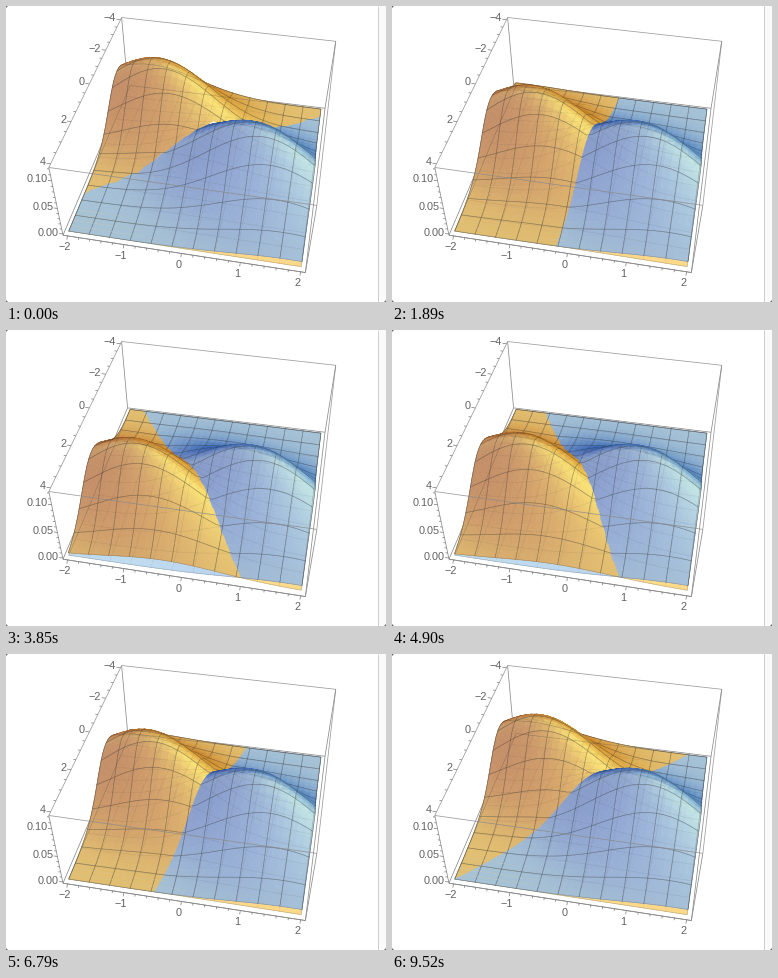
Write a matplotlib script that moves like this. It is 380x296 px and loops after 9660 ms.

```python
import numpy as np
import matplotlib.pyplot as plt
from matplotlib.animation import FuncAnimation
from matplotlib.collections import LineCollection, PolyCollection

W, H, DPI = 380, 296, 100
FRAMES, STEP_MS = 138, 70
N, MESH = 33, 3                      # cells per side, cells per mesh line

# Two normal densities with a shared covariance; only the first one moves.
COV = 1.1 * np.array([[1, 0.5], [0.5, 2]])
INV = np.linalg.inv(COV)
PEAK = 1 / (2 * np.pi * np.sqrt(np.linalg.det(COV)))
FIXED = np.array([1.0, 0.8])
MOVING_X = -1.03
LOW, HIGH, LEG = -2.07, 1.4, 53.75

# Frames on which the motion pauses
HOLDS = {10, 32, 41, 50, *range(63, 68), *range(78, 81), *range(100, 103),
         110, *range(122, 126), 137}
STEPS = np.cumsum([0] + [k not in HOLDS for k in range(1, FRAMES)])

# Flat colour, then its change with tilt to the right, front and back
ORANGE = np.array([[226, 191, 112], [40, 58, 10], [-16, -33, -6],
                   [-55, -125, -125]]) / 255
BLUE = np.array([[166, 194, 214], [45, 56, 22], [-6, -9, 6],
                 [-170, -135, -45]]) / 255
INK = (0.2, 0.2, 0.2)

BX, BY, Z0, Z1 = 2.08, 4.16, -0.0024, 0.1227


def fit_camera(world, pixels):
    rows, rhs = [], []
    for p, (u, v) in zip(world, pixels):
        p = np.array(p, float)
        one = [*p, 1]
        rows += [[*one, 0, 0, 0, 0, *(-u * p)], [0, 0, 0, 0, *one, *(-v * p)]]
        rhs += [u, v]
    sol = np.linalg.lstsq(np.array(rows), np.array(rhs), rcond=None)[0]
    return np.append(sol, 1).reshape(3, 4)


CORNERS = [(-1, -1, -1), (1, -1, -1), (1, 1, -1), (-1, 1, -1),
           (-1, -1, 1), (1, -1, 1), (1, 1, 1), (-1, 1, 1)]
CAM = fit_camera(CORNERS, [(122, 78), (318.5, 101.5), (299.5, 267), (57, 229.5),
                           (115, 11.5), (330.5, 36), (310.5, 199), (43, 161)])


def project(x, y, z):
    x, y, z = np.broadcast_arrays(x, y, z)
    p = np.stack([x / BX, y / BY, 2 * (z - Z0) / (Z1 - Z0) - 1,
                  np.ones(x.shape)], -1) @ CAM.T
    return p[..., :2] / p[..., 2:]


def density(x, y, mean):
    dx, dy = x - mean[0], y - mean[1]
    gx = INV[0, 0] * dx + INV[0, 1] * dy
    gy = INV[1, 0] * dx + INV[1, 1] * dy
    z = PEAK * np.exp(-(dx * gx + dy * gy) / 2)
    return z, -z * gx, -z * gy


def shade(x, y, mean, tone):
    _, zx, zy = density(x, y, mean)
    zx, zy = 12.8 * zx, 25.6 * zy
    size = np.sqrt(1 + zx ** 2 + zy ** 2)
    nx, ny = (-zx / size)[..., None], (-zy / size)[..., None]
    rgb = (tone[0] + tone[1] * nx + tone[2] * np.maximum(ny, 0)
           + tone[3] * np.maximum(-ny, 0))
    return np.clip(rgb, 0, 1)


def cells(p):
    return np.stack([p[:-1, :-1], p[:-1, 1:], p[1:, 1:], p[1:, :-1]], 2)


def flat_segment(p, q):
    return np.stack([p, q, q, p], -2)


XS, YS = np.linspace(-2, 2, N + 1), np.linspace(-4, 4, N + 1)
GX, GY = np.meshgrid(XS, YS)


def mean_at(frame):
    leg = STEPS[frame] / LEG % 2
    return np.array([MOVING_X, LOW + (HIGH - LOW) * min(leg, 2 - leg)])


def snapped_grid(mean):
    """Pull one vertex of each row onto the line where the densities agree."""
    n = INV @ (FIXED - mean)
    mid = (FIXED + mean) / 2
    slope = -n[1] / n[0]
    edge = mid[0] + slope * (YS - mid[1])
    gx = GX.copy()
    k = np.rint((edge + 2) / 4 * N).astype(int)
    ok = (k > 0) & (k < N)
    gx[np.where(ok)[0], k[ok]] = edge[ok]
    return gx, slope


def scene(frame):
    mean = mean_at(frame)
    gx, slope = snapped_grid(mean)
    # Split the cells along the diagonal that follows the meeting line
    split = [[0, 1, 2, 2], [0, 2, 3, 3]] if slope > 0 else [[0, 1, 3, 3], [1, 2, 3, 3]]

    def triangles(a):
        c = cells(a)[:, :, split]
        return c.reshape(N, 2 * N, 4, *c.shape[4:])

    def middle(a):
        return triangles(a)[:, :, :3].mean(2)

    za, zb = density(gx, GY, mean)[0], density(gx, GY, FIXED)[0]
    sa, sb = project(gx, GY, za), project(gx, GY, zb)
    tx, ty = middle(gx), middle(GY)
    top = (middle(za - zb) > 0)[..., None]
    upper = np.where(top[..., None], triangles(sa), triangles(sb))
    upper_rgb = np.where(top, shade(tx, ty, mean, ORANGE), shade(tx, ty, FIXED, BLUE))

    qx, qy = cells(gx).mean(2), cells(GY).mean(2)
    low = (cells(za - zb).mean(2) <= 0)[..., None]
    lower = np.where(low[..., None], cells(sa), cells(sb))
    lower_rgb = np.where(low, shade(qx, qy, mean, ORANGE), shade(qx, qy, FIXED, BLUE))
    lower_rgb = np.minimum(lower_rgb + 0.1, 1)

    za, zb = density(GX, GY, mean)[0], density(GX, GY, FIXED)[0]
    pa, pb = project(GX, GY, za), project(GX, GY, zb)
    ridge = np.where((za > zb)[..., None], pa, pb)
    across = flat_segment(ridge[:-1, :-1], ridge[:-1, 1:])
    along = flat_segment(ridge[:-1, ::MESH], ridge[1:, ::MESH])

    # Back to front by row: lower cells, upper cells, then mesh lines
    verts = np.concatenate([lower, upper, across, along], 1)
    fills = np.concatenate([lower_rgb, upper_rgb], 1)
    return verts.reshape(-1, 4, 2)[KEEP], fills, pa, pb


N_LINES = N + N // MESH + 1
LINE_RGBA = np.full((N, N_LINES, 4), (*INK, 0.42))
WIDTHS = np.concatenate([np.full((N, 3 * N), 0.4),
                         np.full((N, N_LINES), 0.45)], 1)

# The lower sheet shows only near the front rim; not every row has a mesh line
USED = np.ones((N, 3 * N + N_LINES), bool)
USED[:-4, :N] = False
USED[:, 3 * N:4 * N] = (np.arange(N) % MESH == 0)[:, None]
KEEP = USED.ravel()


def rgba(fills):
    solid = np.concatenate([fills, np.ones(fills.shape[:2] + (1,))], -1)
    face = np.concatenate([solid, np.zeros_like(LINE_RGBA)], 1)
    edge = np.concatenate([solid, LINE_RGBA], 1)
    return face.reshape(-1, 4)[KEEP], edge.reshape(-1, 4)[KEEP]


fig = plt.figure(figsize=(W / DPI, H / DPI), dpi=DPI, facecolor="white")
ax = fig.add_axes([0, 0, 1, 1])
ax.set_xlim(0, W)
ax.set_ylim(H, 0)
ax.axis("off")


def line(p, q, color="#8a8a8a", lw=0.55, z=1, alpha=1):
    ax.plot([p[0], q[0]], [p[1], q[1]], color=color, lw=lw, zorder=z, alpha=alpha,
            solid_capstyle="butt")


def draw_box():
    pts = [project(BX * a, BY * b, Z1 if c > 0 else Z0) for a, b, c in CORNERS]
    for i in range(4):
        j = (i + 1) % 4
        line(pts[i], pts[j])
        line(pts[i + 4], pts[j + 4], z=5, alpha=0.85)
        line(pts[i], pts[i + 4], z=5 if i > 1 else 1)
    line(pts[2], pts[3], z=5)


def draw_axis(place, values, major, push, offset, fmt, ha):
    push = np.array(push)
    for v in values:
        p = project(*place(v))
        big = abs(v / major - round(v / major)) < 1e-6
        line(p, p + push * (1 if big else 0.6), color="#777777", lw=0.5, z=5)
        if big:
            text = fmt.format(v + 0.0).replace("-", "\u2212")
            ax.text(p[0] + offset[0], p[1] + offset[1], text, ha=ha, va="center",
                    fontsize=7.8, family="Liberation Sans", color="#626262")


draw_box()
draw_axis(lambda v: (v, BY, Z0), np.round(np.arange(-10, 11) * 0.2, 2), 1,
          (-0.6, 3.8), (-3, 11.5), "{:.0f}", "center")
draw_axis(lambda v: (-BX, v, Z1), np.arange(-8, 9) * 0.5, 2,
          (-4, -0.6), (-5, -1.5), "{:.0f}", "right")
draw_axis(lambda v: (-BX, BY, v), np.round(np.arange(0, 13) * 0.01, 2), 0.05,
          (-3.6, -0.5), (-4, -1.5), "{:.2f}", "right")

# Window frame at the right and its rounded corners
ax.add_patch(plt.Rectangle((372, 0), 8, H, color="#fafafa", lw=0, zorder=0))
line((371.5, 0), (371.5, H), color="#cfcfcf", lw=0.72)
for x, y in [(0, 0), (0, H), (W, H)]:
    sx, sy = (2 if x == 0 else -2), (2 if y == 0 else -2)
    ax.add_patch(plt.Polygon([(x, y), (x + sx, y), (x, y + sy)], color="#666666", lw=0))

surface = PolyCollection([], linewidths=WIDTHS.ravel()[KEEP], zorder=2)
ghost = LineCollection([], linewidths=0.45, zorder=3)
ax.add_collection(surface, autolim=False)
ax.add_collection(ghost, autolim=False)

# Lines that show faintly through the sheets; the rims are stronger
FAINT = np.full(N // MESH + 1, 0.1)
FAINT[[0, -1]] = 0.3
ghost.set_color([(*INK, a) for a in np.tile(FAINT, 4)])


def update(frame):
    verts, fills, pa, pb = scene(frame)
    face, edge = rgba(fills)
    surface.set_verts(verts)
    surface.set_facecolor(face)
    surface.set_edgecolor(edge)
    ghost.set_segments([s for p in (pa, pb)
                        for s in (*p[::MESH], *p[:, ::MESH].swapaxes(0, 1))])
    return surface, ghost


anim = FuncAnimation(fig, update, frames=FRAMES, interval=STEP_MS,
                     init_func=lambda: update(0), repeat=True, repeat_delay=0,
                     blit=False)
plt.show()
```
